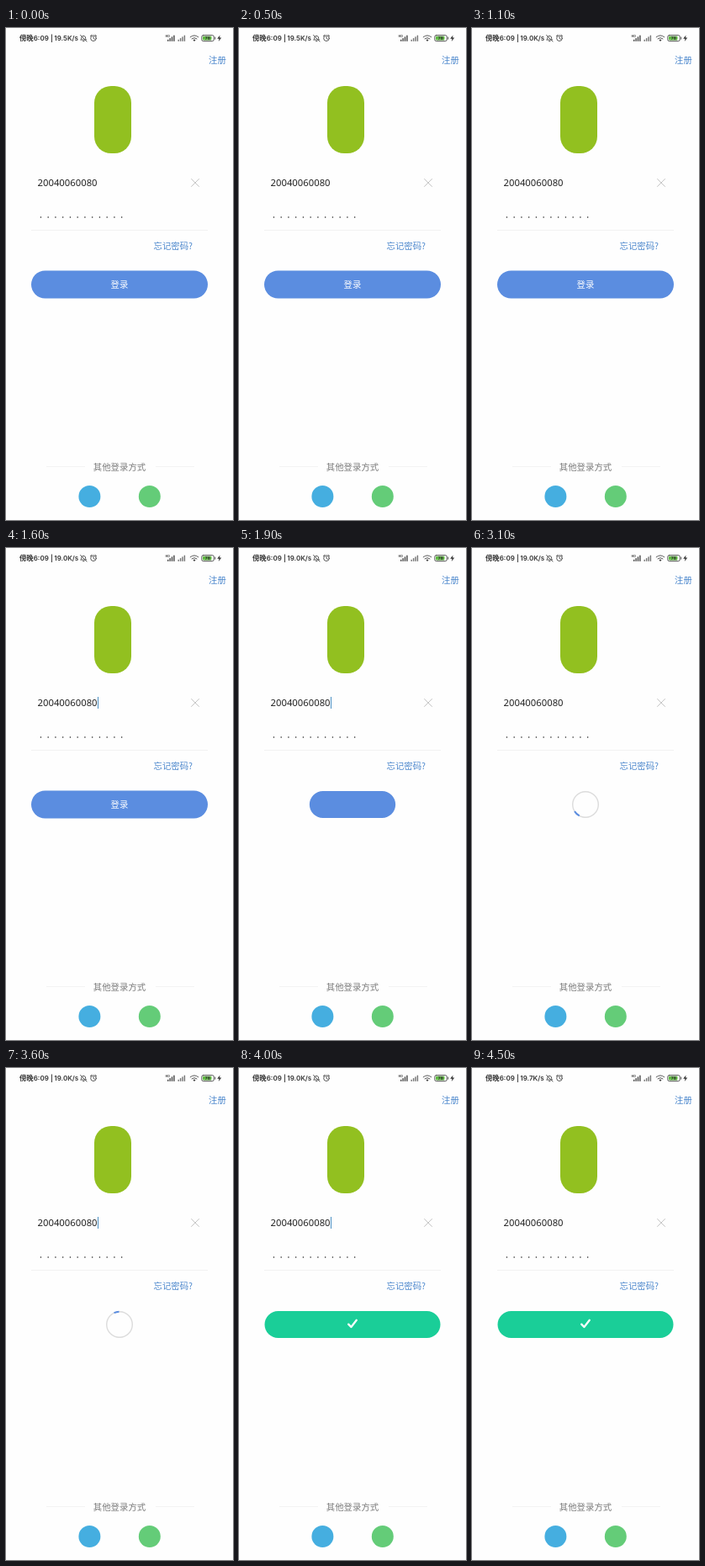
Write an HTML page that moves like this. It is 270 px wide and 585 px high and loops after 4.6 s.

```html
<!DOCTYPE html>
<html lang="zh-CN">
<head>
<meta charset="utf-8">
<title>登录</title>
<style>
html, body { margin: 0; width: 100%; height: 100%; overflow: hidden; background: #fefefe; }
svg { display: block; width: 100%; height: 100%; }
text { font-family: "Noto Sans CJK SC", "Noto Sans CJK", sans-serif; }
.status { font: 600 8px Inter, "Noto Sans CJK SC", "Noto Sans CJK", sans-serif; fill: #333; }
.link { font-size: 10.4px; fill: #4a86cc; }
.line { fill: none; stroke-linecap: round; stroke-linejoin: round; }
</style>
</head>
<body>
<svg viewBox="0 0 270 585" xmlns="http://www.w3.org/2000/svg">
  <rect width="270" height="585" fill="#fefefe"/>

  <!-- Status bar -->
  <text class="status" x="16" y="15"><tspan font-size="8.4">傍晚</tspan>6:09</text>
  <text class="status" x="53" y="15">|</text>
  <text class="status" id="speed" x="57.3" y="15"></text>
  <g class="line" stroke="#444" stroke-width=".9">
    <path d="M89 14H95.5L94.5 12.5V11A2.5 2.5 0 0 0 89.8 11V12.5ZM91.5 15.7H93M88.5 8.5L96 16"/>
    <circle cx="104" cy="12.2" r="3.3"/>
    <path d="M104 10.4V12.4L105.3 13.2M100.4 9.6L102 8.2M107.6 9.6L106 8.2"/>
    <path d="M219.2 10.8Q224 6.8 228.8 10.8M221 12.8Q224 10.3 227 12.8"/>
    <rect x="232.8" y="8.6" width="14.4" height="7" rx="1.8"/>
    <path d="M248.8 11V13.2"/>
  </g>
  <path d="M222.5 14.2Q224 13 225.5 14.2L224 16Z" fill="#444"/>
  <rect x="234" y="9.8" width="10.5" height="4.6" rx=".8" fill="#63bd45"/>
  <text x="239.8" y="14.2" text-anchor="middle" style="font:700 5.6px 'Open Sans',sans-serif" fill="#333">78</text>
  <path d="M254.5 8.5L251.2 12.7H253.5L252.8 16L256.2 11.5H254Z" fill="#333"/>
  <text x="189.5" y="11" style="font:700 3.6px 'Open Sans',sans-serif" fill="#444">HD</text>
  <g id="signal" fill="#444"></g>

  <text class="link" x="241" y="41.8">注册</text>
  <rect x="105" y="69" width="44" height="80" rx="20" fill="#92c020"/>

  <!-- Form -->
  <text x="37.5" y="188.2" style="font:400 11.3px 'Noto Sans',sans-serif" fill="#222">20040060080</text>
  <rect id="cursor" x="109" y="177" width="1" height="14" fill="#4a90c4"/>
  <path class="line" d="M220.5 179.5L229.5 188.5M229.5 179.5L220.5 188.5" stroke="#c6c6c6"/>
  <g id="dots" fill="#222"></g>
  <path d="M30 240.5H240" stroke="#f2f2f2"/>
  <text class="link" x="175.5" y="263">忘记密码?</text>

  <!-- Button -->
  <rect id="button"/>
  <text id="label" x="135" y="308.7" text-anchor="middle" font-size="10.4" fill="#fff">登录</text>
  <g id="loader" class="line" stroke-width="1.4">
    <circle cx="135" cy="305" r="15.3" stroke="#dcdcdc"/>
    <circle id="arc" cx="135" cy="305" r="15.3" pathLength="360" stroke="#5b8de0" stroke-width="2"
      stroke-linecap="butt" transform="rotate(-90 135 305)"/>
  </g>
  <path id="check" class="line" d="M130.2 304.6L133.4 308L139.8 299.8" stroke="#fff" stroke-width="2.3"/>

  <!-- Other sign-in options -->
  <path d="M48 521.5H94M178 521.5H224" stroke="#f3f3f3"/>
  <text x="135" y="526" text-anchor="middle" font-size="10.4" fill="#7a7a7a">其他登录方式</text>
  <circle cx="99.4" cy="557" r="13" fill="#45aee0"/>
  <circle cx="170.8" cy="557" r="13" fill="#64cc78"/>
</svg>
<script>
const LOOP = 4600;
const SHRINK = 1618, SPIN = 2110, DONE = 3610;
const BLUE = '#5b8de0', GREEN = '#1ace98';
const $ = id => document.getElementById(id);
const clamp = v => Math.min(1, Math.max(0, v));
const part = (t, start, length) => clamp((t - start) / length);
const ease = p => (1 - Math.cos(Math.PI * p)) / 2;

function set(el, attrs) {
  for (const name in attrs) el.setAttribute(name, attrs[name]);
}

function add(parent, tag, attrs) {
  const el = document.createElementNS('http://www.w3.org/2000/svg', tag);
  set(el, attrs);
  parent.append(el);
}

function signal(x, alpha) {
  for (let i = 0; i < 4; i++) {
    const height = 2 + i * 1.7;
    add($('signal'), 'rect', { x: x + i * 2.4, y: 15.8 - height, width: 1.4, height, opacity: alpha });
  }
}

signal(192, 1);
signal(204.5, 0.75);
for (let i = 0; i < 12; i++) add($('dots'), 'circle', { cx: 41.4 + i * 8.75, cy: 225, r: 0.8 });

function drawButton(t) {
  const idle = t < SHRINK;
  const done = t >= DONE;
  const width = done
    ? 32 + 177 * ease(part(t, DONE, 380))
    : 209 - 177 * ease(part(t, SHRINK, 500));
  const box = idle ? { w: 210, h: 33 } : { w: width, h: 32 };
  set($('button'), {
    x: 135 - box.w / 2, y: 305 - box.h / 2, width: box.w, height: box.h, rx: box.h / 2,
    fill: done ? GREEN : BLUE,
    opacity: done ? part(t, DONE, 80) : 1 - part(t, 2070, 80)
  });
  set($('label'), { opacity: 1 - part(t, SHRINK, 150) });
  set($('check'), { opacity: part(t, 3800, 150) });
}

// The tail sets off later than the head and slowly gains on it.
function drawLoader(t) {
  const head = 360 * part(t, SPIN, 1500);
  const tail = 360 * part(t, SPIN + 166, 1424);
  set($('loader'), { opacity: t < DONE ? part(t, 2060, 60) : 1 - part(t, DONE, 80) });
  set($('arc'), { 'stroke-dasharray': `0 ${tail} ${head - tail} 400` });
}

function draw(t) {
  $('speed').textContent = (t < 600 ? '19.5' : t < 4300 ? '19.0' : '19.7') + 'K/s';
  set($('cursor'), { opacity: t >= 600 && (t + 400) % 1000 < 500 ? 1 : 0 });
  drawButton(t);
  drawLoader(t);
}

const start = performance.now();
function frame() {
  draw((performance.now() - start) % LOOP);
  requestAnimationFrame(frame);
}
draw(0);
requestAnimationFrame(frame);
</script>
</body>
</html>
```
